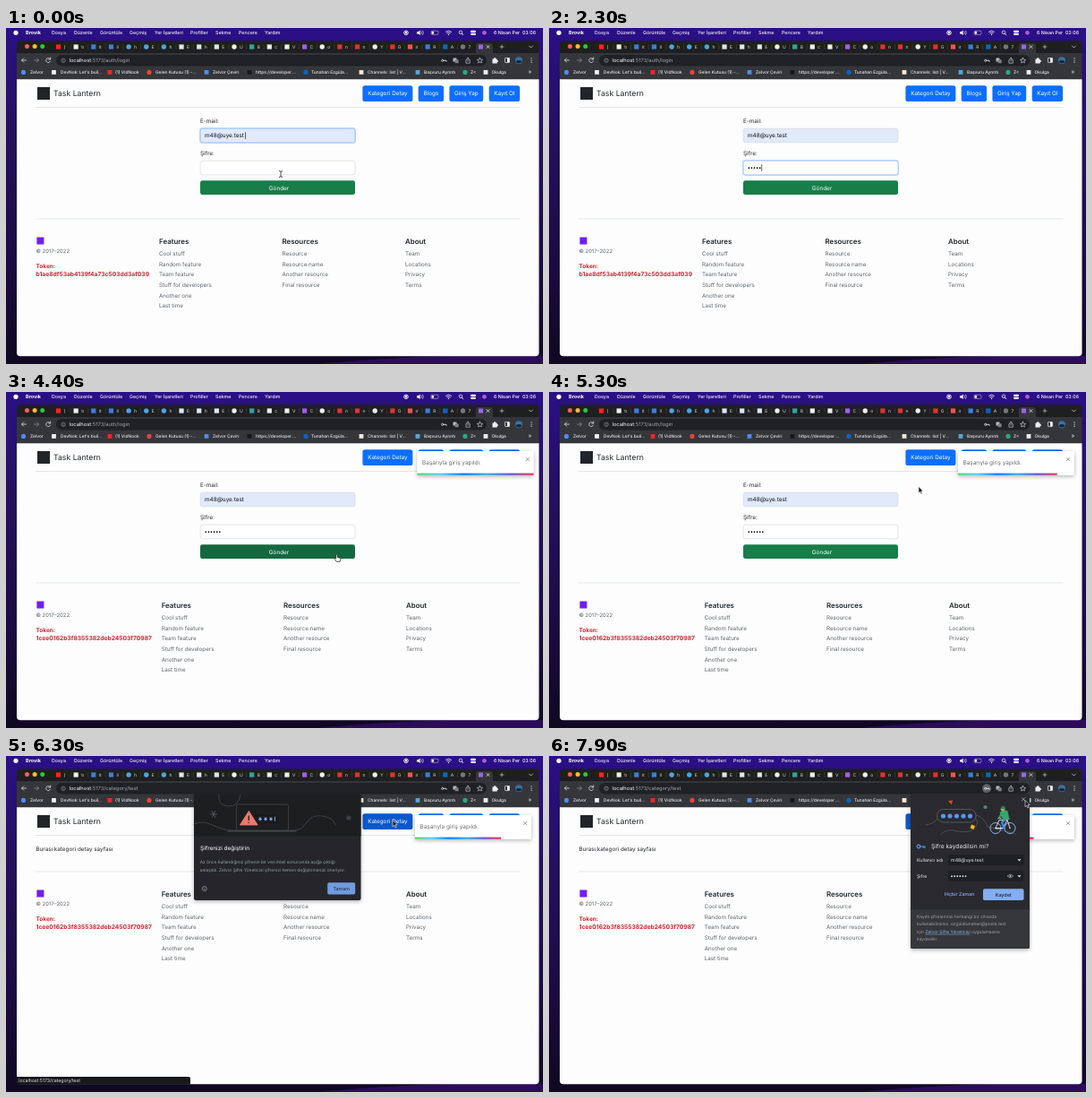
Animation, 600 px wide and 375 px high, one loop 8000 ms. Source, as an HTML page:

```html
<!DOCTYPE html>
<html lang="tr">
<head>
<meta charset="utf-8">
<title>Login screen recording</title>
<style>
  html, body { margin: 0; width: 100%; height: 100%; overflow: hidden; background: #0d0819; }
  svg { display: block; width: 100vw; height: 100vh; }
  text { font-family: Inter, "Open Sans", sans-serif; white-space: pre; text-rendering: geometricPrecision; }
</style>
</head>
<body>
<svg id="stage" viewBox="0 0 600 375"></svg>
<script>
const LOOP = 8000, STEP = 100;
const EMAIL = "m48@uye.test";
const BLUE = "#0d6efd", INK = "#212529", GRAY = "#5d656c", SOFT = "#dfe1e5", SKY = "#8ab4f8";

// Markup helpers
const rect = (x, y, w, h, fill, r = 0, more = "") =>
  `<rect x="${x}" y="${y}" width="${w}" height="${h}" rx="${r}" fill="${fill}" ${more}/>`;
const dot = (x, y, r, fill, more = "") => `<circle cx="${x}" cy="${y}" r="${r}" fill="${fill}" ${more}/>`;
const line = (d, stroke, w = 0.8, more = "") =>
  `<path d="${d}" fill="none" stroke="${stroke}" stroke-width="${w}" stroke-linecap="round" stroke-linejoin="round" ${more}/>`;
const shape = (d, fill, more = "") => `<path d="${d}" fill="${fill}" ${more}/>`;
const text = (x, y, s, size, fill, more = "") =>
  `<text x="${x}" y="${y}" font-size="${size}" fill="${fill}" ${more}>${s}</text>`;
const group = (id, body, more = "") => `<g id="${id}" ${more}>${body}</g>`;
const dots = (n, x, y, gap, r, fill) =>
  Array.from({ length: n }, (_, i) => dot(x + i * gap, y, r, fill)).join("");
const MIDDLE = 'text-anchor="middle"', BOLD = 'font-weight="700"', MEDIUM = 'font-weight="500"';
const cross = (x, y, r, color) =>
  line(`M${x - r} ${y - r}l${2 * r} ${2 * r}m0 ${-2 * r}l${-2 * r} ${2 * r}`, color, 0.7);

function desktop() {
  const menu = [["Dosya", 51], ["Düzenle", 76], ["Görüntüle", 105], ["Geçmiş", 138], ["Yer İşaretleri", 166],
    ["Profiller", 206], ["Sekme", 234], ["Pencere", 260], ["Yardım", 289]];
  return rect(0, 0, 600, 375, "url(#wall)") + shape("M350 375q70-7 150-9h100v9z", "#2c0c58") +
    rect(0, 0, 600, 11, "#2b0f86") +
    dot(11, 5.3, 2.6, "#fff") + text(22, 7.2, "Brovik", 5.5, "#fff", BOLD) +
    menu.map(([s, x]) => text(x, 7.2, s, 5.3, "#f4f1fa", MEDIUM)).join("") +
    dot(447, 5.3, 2.3, "none", 'stroke="#fff" stroke-width=".9"') + dot(447, 5.3, 1.2, "#fff") +
    shape("M459 4.2h1.6l2-1.6v5.4l-2-1.6H459z", "#fff") + line("M464 3.8q1.2 1.5 0 3M465.6 3q1.8 2.3 0 4.6", "#fff", 0.6) +
    rect(475, 3.2, 8, 4.2, "none", 1, 'stroke="#bbb" stroke-width=".6"') + rect(475.7, 3.9, 2.2, 2.8, "#fff") +
    line("M491.5 4.2q3-2.4 6 0M492.8 5.7q1.7-1.4 3.4 0", "#fff", 0.8) + dot(494.5, 7.2, 0.7, "#fff") +
    dot(508, 4.8, 1.8, "none", 'stroke="#fff" stroke-width=".7"') + line("M509.3 6.2l1.5 1.6", "#fff") +
    rect(519, 2.8, 6, 2.2, "#fff", 1.1) + rect(519, 5.7, 6, 2.2, "#fff", 1.1) +
    dot(534.5, 5.3, 2.4, "#b05bd6") +
    text(592, 7.2, "6 Nisan Per  03:06", 5.3, "#fff", 'text-anchor="end" ' + MEDIUM);
}

function tabs() {
  const labels = "(,tı,it,ll,h,E,h,E,h,E,U,B,c,V,C,o,n,n,Y,G,ir,R,A,7".split(",");
  const tones = ["#f22", "#eee", "#3b7ddd", "#3b7ddd", "#4da3e8", "#4da3e8", "#4da3e8", "#dce6f7", "#dce6f7",
    "#dce6f7", "#eee", "#36a0a8", "#eee", "#eee", "#a45cf0", "#eee", "#d33", "#d33",
    "#eee", "#d33", "#e55", "#3b7ddd", "#0a66c2", "#777"];
  const round = [4, 5, 6, 10, 15, 18, 23], gap = 19.65;
  return rect(12, 14, 583.5, 40, "#1f1f22", 4) +
    ["#ff5f57", "#febc2e", "#28c840"].map((c, i) => dot(23.5 + i * 8.6, 20.6, 2.5, c)).join("") +
    labels.map((s, i) => {
      const x = 58.5 + i * gap;
      const icon = round.includes(i) ? dot(x, 21, 2.7, tones[i]) : rect(x - 2.6, 18.4, 5.2, 5.2, tones[i]);
      return icon + text(x + 6, 23, s, 5, "#d5d6d9") + (i < 23 ? line(`M${x + 13.5} 18.5v5`, "#55565a", 0.4) : "");
    }).join("") +
    shape("M523 29q2 0 2-3v-6q0-3 3-3h13q3 0 3 3v6q0 3 2 3z", "#35363a") +
    rect(528, 18.5, 5, 5, "#9b62f0") + cross(538.5, 21, 1.5, "#fff") +
    line("M552 21h4m-2-2v4", SOFT, 0.6) + line("M584.5 20l2 2 2-2", SOFT, 0.7);
}

function toolbar() {
  const marks = [[19.5, "#4c8bf5", 27, "Zelvor"], [53.5, "#f0f0f0", 61, "DevNok: Let's buil..."],
    [116, "#f22", 122, "(1) VidNook"], [160, "#ea4335", 167, "Gelen Kutusu (1) -..."],
    [224, "#4c8bf5", 231, "Zelvor Çeviri"], [272, "#16181c", 279, "https://developer...."],
    [335, "#0a66c2", 341, "Tunahan Ezgüla..."], [397, "#f4e9d4", 404, "Channels: list | V..."],
    [460, "#54a8d8", 467, "Başvuru Ayrıntı"], [513, "#2aa978", 519, "Z<"], [536, "#eee", 542.5, "Okulga"]];
  return rect(12, 28, 583.5, 30, "#35363a") + rect(56, 30, 481, 12.4, "#202124", 6.2) +
    line("M22.5 36h-5m2.2-2.2L17.5 36l2.2 2.2", SOFT) + line("M31.5 36h5m-2.2-2.2l2.2 2.2-2.2 2.2", "#85878b") +
    line("M49.4 34.8a2.5 2.5 0 1 0 .1 2.3M49.7 33v2h-2", SOFT) +
    dot(64, 36.2, 2.2, "none", 'stroke="#9aa0a6" stroke-width=".6"') + line("M64 36v1.2m0-2.3v.1", "#9aa0a6", 0.6) +
    `<text x="70.5" y="38.2" font-size="5.75" fill="#fff">localhost<tspan id="path" fill="#a5a9af"></tspan></text>` +
    dot(489, 36.3, 5, "#5f6368", 'id="keyGlow"') + dot(487.7, 36.3, 1.1, "none", 'stroke="#fff" stroke-width=".7"') +
    line("M489 36.3h3v1", "#fff", 0.8) +
    rect(499.5, 33.5, 4, 4, "#b8bbc0", 0.5) + rect(501.7, 35.3, 4, 4, "#7c8085", 0.5) +
    line("M514.7 35.6h-.8v3.6h4.4v-3.6h-.8M516.1 37v-3.8m-1.3 1.2l1.3-1.3 1.3 1.3", SOFT, 0.6) +
    line("M529.5 33.2l.9 2 2.2.2-1.7 1.4.5 2.2-1.9-1.2-1.9 1.2.5-2.2-1.7-1.4 2.2-.2z", SOFT, 0.6) +
    shape("M543.5 34.5h1.5q0-1.5 1.2-1.5t1.2 1.5h1.3v1.6q1.4 0 1.4 1t-1.4 1v1.3h-5.2z", "#eee") +
    rect(557.5, 33.5, 5, 5, "none", 0.6, 'stroke="#eee" stroke-width=".7"') + rect(560, 33.5, 2.5, 5, "#eee") +
    dot(573, 36.2, 4, "#3971a8") + shape("M569.4 37.2q3.6-2.5 7.2 0a4 4 0 0 1-7.2 0z", "#12283c") +
    [33.8, 36, 38.2].map(y => dot(587, y, 0.6, "#fff")).join("") +
    marks.map(([ix, c, tx, s], i) =>
      (i % 3 ? rect(ix - 2.4, 47, 4.8, 4.8, c) : dot(ix, 49.4, 2.6, c)) + text(tx, 51.2, s, 4.85, "#e8eaed", MEDIUM)).join("") +
    text(583.5, 51.4, "»", 6.5, "#e8eaed");
}

function header() {
  const buttons = [["Kategori Detay", 398.4, 56], ["Blogs", 460.7, 28.4], ["Giriş Yap", 495.4, 37.8], ["Kayıt Ol", 539.7, 34.4]];
  return rect(35, 66, 14, 14, INK) + text(53, 76.4, "Task Lantern", 8.7, INK) +
    buttons.map(([s, x, w], i) => rect(x, 64.2, w, 17.8, BLUE, 2.6, `id="nav${i}"`) +
      text(x + w / 2, 75.3, s, 6.35, "#fff", MIDDLE)).join("") +
    line("M33.5 88.5H574", "#d9dce0", 0.7);
}

const field = (id, y) => rect(216, y - 1, 175, 18, "#c2dbfe", 3.4, `id="${id}Ring"`) +
  rect(217.2, y + 0.2, 172.8, 15.6, "#fff", 2.4, `id="${id}" stroke="#ced4da" stroke-width=".6"`);

function form() {
  return text(217, 106.3, "E-mail:", 6.35, INK) + field("mail", 112) + text(222, 122.4, EMAIL, 6.4, "#111") +
    text(217, 142.2, "Şifre:", 6.35, INK) + field("pass", 148) + group("typed", "") +
    rect(0, 0, 0.6, 7.5, "#000", 0, 'id="caret"') +
    rect(215.9, 169.2, 175.2, 18, "#b5d8c8", 3.4, 'id="sendRing"') +
    rect(217, 170.3, 173, 15.8, "#177d49", 2.4, 'id="send"') +
    text(305, 180.6, "Gönder", 6.35, "#fff", MIDDLE);
}

function footer() {
  const columns = [
    ["Features", "Cool stuff", "Random feature", "Team feature", "Stuff for developers", "Another one", "Last time"],
    ["Resources", "Resource", "Resource name", "Another resource", "Final resource"],
    ["About", "Team", "Locations", "Privacy", "Terms"]];
  return line("M33.5 213H574", "#d9dce0", 0.7) + rect(34.4, 233.5, 8, 8, "#6f1ff2") +
    text(33.5, 251.2, "© 2017–2022", 5.9, GRAY) +
    text(33.5, 267.7, "Token:", 6.5, "#d5222f", BOLD) + text(33.5, 277.3, "", 6.7, "#d5222f", BOLD + ' id="token"') +
    columns.map(([title, ...items], i) => group("col" + i,
      text(0, 241.4, title, 7.9, INK, 'font-weight="600"') +
      items.map((s, k) => text(0, 254 + k * 11.68, s, 6.27, GRAY)).join(""))).join("");
}

function toast() {
  return rect(457, 66, 130, 26.8, "#fff", 1.6, 'filter="url(#shade)"') +
    text(462.5, 81.3, "Başarıyla giriş yapıldı.", 6.45, "#6c6c6c") + cross(580.2, 75, 1.7, "#777") +
    rect(457, 90.6, 130, 2.2, "url(#rainbow)", 0, 'id="progress"');
}

function bicycle() {
  const wheel = x => dot(x, 80.5, 6, "none", 'stroke="#8ab4f8" stroke-width="1"') + dot(x, 80.5, 0.8, SKY);
  return wheel(499) + wheel(515) +
    line("M499 80.5l4-9h9l-5 9zl8 0M512 71.5l3 9M502 69.5h3", "#e8eaed", 0.9) +
    line("M511 70l-5 4 2.5 6.5", "#4285f4", 2.2) +
    shape("M503.5 63q4.5-4 9-1.5l2 9.5-7 .8z", "#34a86c") + line("M505.5 64.5l-3 5", "#34a86c", 1.8) +
    dot(507, 59.3, 2.3, "#d99a78") + shape("M504.5 58.8q.5-3.4 3.5-3 2.6.6 1.9 3.6z", "#2e7d52");
}

function savePopup() {
  const note = ["Kayıtlı şifrelerinizi herhangi bir cihazda", "kullanabilirsiniz. ezgulatunahan@posta.test",
    `için <tspan fill="${SKY}" text-decoration="underline">Zelvor Şifre Yöneticisi</tspan> uygulamasına`, "kaydedilir."];
  const label = (y, s) => text(411, y + 1.9, s, 5.2, "#e8eaed") + rect(446, y - 6, 84.5, 12, "#1f2023", 1.5) +
    shape(`M523.5 ${y - 0.8}h4l-2 2.2z`, "#e8eaed");
  return rect(404, 42.5, 133, 172.5, "#292a2d", 2, 'filter="url(#shade)"') +
    shape("M404 172h133v41q0 2-2 2H406q-2 0-2-2z", "#36373a") + line("M404 172h133", "#434448", 0.5) +
    line("M421 77q8-1 12-6t5-9M477 70q4 6 -2 11t-19 3q-10-4-18 3M477 66q9 2 13 13l31 8", "#63666b", 0.6) +
    rect(433.5, 59.5, 43.5, 14.5, "#292a2d", 7, 'stroke="#686b70" stroke-width=".7"') +
    dots(5, 440.5, 67, 7.5, 2.6, "#5b94f2") +
    shape("M446 50.2l5-1-1.3 5z", "#ea4335") + dot(487.5, 57, 2.1, "#4c8f68") +
    shape("M472 76.5l4 1.4-1.6 4-3.7-1.6z", "#fbbc04") + bicycle() + cross(530.2, 48.3, 1.7, "#c4c7cb") +
    dot(413, 101, 1.9, "none", 'stroke="#5b94f2" stroke-width="1.1"') + line("M415 101h5v1.6m-1.8-1.6v1.2", "#5b94f2", 1.1) +
    text(427, 103.4, "Şifre kaydedilsin mi?", 6.65, "#e8eaed") +
    label(116, "Kullanıcı adı") + text(449, 118, EMAIL, 5.3, "#e8eaed") +
    label(134, "Şifre") + dots(6, 450, 134.2, 3.1, 0.9, "#e8eaed") +
    line("M512.5 134q3-3.6 6 0-3 3.6-6 0z", "#bdc1c6", 0.7) + dot(515.5, 134, 0.9, "#bdc1c6") +
    text(458.5, 156.4, "Hiçbir Zaman", 5.3, SKY, MIDDLE + " " + MEDIUM) +
    rect(485, 148.2, 45.5, 12.8, "#83aef4", 1.8) + text(507.7, 156.5, "Kaydet", 5.4, "#202124", MIDDLE + " " + MEDIUM) +
    note.map((s, i) => text(411, 180.6 + i * 8.6, s, 4.9, "#9aa0a6")).join("");
}

function breachPopup() {
  const star = (x, y, r, c) => line(`M${x - r} ${y}h${2 * r}M${x - r / 2} ${y - r}l${r} ${2 * r}m0 ${-2 * r}l${-r} ${2 * r}`, c, 0.9);
  return rect(210, 42.5, 186.5, 118.5, "#252629", 2, 'filter="url(#shade)"') +
    rect(210, 42.5, 186.5, 47, "#1d1e20") +
    line("M210 76q10-4 18 0t20 7h74q8 0 14-9t18-7 14 10M238 43q-2 12 10 13t14-13", "#3f4144", 1) +
    rect(257.5, 54, 58, 29, "#1d1e20", 2, 'stroke="#434548" stroke-width=".8"') + line("M248 84h76", "#505357", 1.2) +
    star(232, 65, 3.4, "#55585c") + dot(383, 69, 2.6, "#3c3e41") +
    rect(277, 65.5, 27, 9.5, "#18191b", 2) +
    [284, 290, 296].map(x => star(x, 70.3, 1.6, SKY)).join("") + line("M300.5 68v4.4", SKY, 0.9) +
    shape("M271.3 61.5l9.8 15.4h-19.6z", "#e9796e", 'stroke="#e9796e" stroke-width="1" stroke-linejoin="round"') +
    line("M271.3 67v4.6m0 2.6v.1", "#252629", 1.4) +
    text(217, 105.4, "Şifrenizi değiştirin", 6.4, "#e8eaed", MEDIUM) +
    text(216.7, 120.4, "Az önce kullandığınız şifrenin bir veri ihlali sonucunda açığa çıktığı", 4.85, "#9aa0a6") +
    text(216.7, 128.8, "anlaşıldı. Zelvor Şifre Yöneticisi şifrenizi hemen değiştirmenizi öneriyor.", 4.85, "#9aa0a6") +
    dot(221.7, 148, 2.5, "none", 'stroke="#9aa0a6" stroke-width=".7"') + line("M221.7 148v1.3m0-2.6v.1", "#9aa0a6", 0.7) +
    rect(359.2, 141.3, 31, 13.2, "#729bdf", 1.8) + text(374.7, 149.9, "Tamam", 5.3, "#202124", MIDDLE);
}

const pointers = {
  beam: line("M-1.6-3.5q1.6 0 1.6 1v5q0 1-1.6 1M1.6-3.5q-1.6 0-1.6 1m0 5q0 1 1.6 1", "#222", 0.8),
  hand: shape("M-1.3-3.2q1-1 1.6.2v2.4l3 .9q.8.4.6 1.4l-.8 2.6h-3.8L-3 1.4q-.3-1.2.8-1l.9.7z", "#fff",
    'stroke="#111" stroke-width=".7" stroke-linejoin="round"'),
  arrow: shape("M0-2.5v7.2l1.7-1.5 1.2 2.7 1.2-.5-1.2-2.7h2.3z", "#111", 'stroke="#fff" stroke-width=".6"')
};

const stops = colors => colors.map((c, i) => `<stop offset="${i / (colors.length - 1)}" stop-color="${c}"/>`).join("");
document.getElementById("stage").innerHTML = `<defs>
  <linearGradient id="wall" x2="0" y2="1">${stops(["#2b0f86", "#25105c", "#1d0b45", "#0f0822"])}</linearGradient>
  <linearGradient id="rainbow">${stops(["#4cd964", "#5ac8fa", "#007aff", "#34aadc", "#5856d6", "#ff2d55"])}</linearGradient>
  <filter id="shade" x="-20%" y="-20%" width="140%" height="150%">
    <feDropShadow dx="0" dy="1.5" stdDeviation="2.2" flood-color="#000" flood-opacity=".3"/></filter>
  <clipPath id="pageClip">${rect(12, 57.3, 583.5, 309, "#000")}</clipPath></defs>` +
  desktop() + tabs() + toolbar() + shape("M12 57.3h583.5v305q0 4-4 4H16q-4 0-4-4z", "#fdfdfd") +
  group("page", header() + group("form", form()) +
    group("detail", text(33.5, 106.3, "Burası kategori detay sayfası", 6.3, INK)) +
    group("footer", footer()) + group("toast", toast()), 'clip-path="url(#pageClip)"') +
  group("status", shape("M12 358h192q2 0 2 2v6.7H16q-4 0-4-4z", "#18191b") +
    text(14.3, 364.2, "localhost:5173/category/test", 5.15, "#e8eaed")) +
  group("save", savePopup()) + group("breach", breachPopup()) +
  Object.entries(pointers).map(([id, body]) => group(id, body)).join("");

const parts = {};
document.querySelectorAll("[id]").forEach(el => parts[el.id] = el);
const set = (id, attrs) => { for (const k in attrs) parts[id].setAttribute(k, attrs[k]); };
const show = (id, on) => set(id, { visibility: on ? "visible" : "hidden" });
const move = (id, x, y) => set(id, { transform: `translate(${x} ${y})` });
const between = (t, a, b) => t >= a && t < b;
const fade = (t, a, b) => Math.max(0, Math.min(1, (t - a) / 150, (b - t) / 150));

// Keys are [time, value]; smooth adds ease in and out.
function track(t, keys, smooth) {
  if (t <= keys[0][0]) return keys[0][1];
  for (let i = 1; i < keys.length; i++) {
    const [a, from] = keys[i - 1], [b, to] = keys[i];
    if (t < b) {
      const u = (t - a) / (b - a);
      return from + (to - from) * (smooth ? u * u * (3 - 2 * u) : u);
    }
  }
  return keys[keys.length - 1][1];
}

const CLICK_PASS = 400, TYPING = 1300, KEY_GAP = 220, POINTER_BACK = 2800, SUBMIT = 3600;
const LOGIN = 3900, HOVER_NAV = 5500, OPEN_DETAIL = 5700, BREACH = 6200, DISMISS = 7400;
const POINTER = [[0, 307, 163], [300, 307, 163], [600, 305, 157], [POINTER_BACK, 305, 157], [3500, 370, 185],
  [4700, 370, 185], [5650, 432, 74], [6400, 432, 74], [7050, 369, 148], [DISMISS, 369, 148], [7850, 532, 52]];
const pointerX = POINTER.map(([t, x]) => [t, x]), pointerY = POINTER.map(([t, , y]) => [t, y]);
const SLIDE = [[3880, 200], [4300, -10], [4405, 3.2], [4510, -2], [4580, 0]];
// The toast timer halts while a popup holds the focus.
const PROGRESS = [[4580, 1], [OPEN_DETAIL, 0.77], [BREACH - 100, 0.77], [BREACH, 0.74], [DISMISS, 0.74], [7900, 0.65]];

function render(t) {
  const loggedIn = t >= LOGIN, detail = t >= OPEN_DETAIL, inMail = t < CLICK_PASS;
  const inPass = between(t, CLICK_PASS, SUBMIT), typing = between(t, TYPING, POINTER_BACK);
  const x = track(t, pointerX, true), y = track(t, pointerY, true);
  const overSend = !detail && between(y, 170, 186.5) && between(x, 217, 390);
  const overNav = between(t, HOVER_NAV, DISMISS);

  parts.path.textContent = ":5173/" + (detail ? "category/test" : "auth/login");
  show("form", !detail);
  show("detail", detail);
  move("footer", 0, detail ? -84 : 0);
  parts.token.textContent = loggedIn ? "1cee0162b3f8355382deb24503f70987" : "b1ae8df53ab4139f4a73c503dd3af039";
  (loggedIn ? [173.7, 310, 447] : [171, 308.5, 446]).forEach((cx, i) => move("col" + i, cx, 0));

  for (const [id, on, fill] of [["mail", inMail, "#e0eafb"], ["pass", inPass, "#fff"]]) {
    set(id + "Ring", { opacity: on ? 1 : 0 });
    set(id, { fill, stroke: on ? "#86b7fe" : "#ced4da" });
  }
  const count = Math.max(0, Math.min(6, 1 + Math.floor((t - TYPING) / KEY_GAP)));
  parts.typed.innerHTML = dots(count, 223.3, 156.2, 3.1, 0.85, "#111");
  const caretOn = t < SUBMIT && (typing || t % 1000 < 500);
  set("caret", { x: inMail ? 267.2 : 222 + count * 3.1, y: inMail ? 116.3 : 152.3, opacity: caretOn ? 1 : 0 });
  set("send", { fill: overSend ? "#14683f" : "#177d49" });
  set("sendRing", { opacity: between(t, SUBMIT, LOGIN) ? 0.5 : 0 });
  set("nav0", { fill: t >= HOVER_NAV ? "#0b57cc" : BLUE });

  show("toast", t >= 3880);
  move("toast", track(t, SLIDE), 0);
  set("progress", { width: 130 * track(t, PROGRESS) });

  const save = Math.max(fade(t, OPEN_DETAIL, BREACH), fade(t, DISMISS, LOOP + 200));
  set("save", { opacity: save });
  set("keyGlow", { opacity: save });
  set("breach", { opacity: fade(t, BREACH - 100, DISMISS + 50) });
  show("status", overNav);

  const kind = overSend || between(t, HOVER_NAV, OPEN_DETAIL + 100) ? "hand"
    : !detail && between(y, 148, 164) && x < 390 ? "beam" : "arrow";
  for (const id in pointers) {
    show(id, id === kind && !typing);
    move(id, x, y);
  }
}

const start = performance.now();
function tick(now) {
  const t = Math.max(0, now - start) % LOOP;
  render(Math.floor(t / STEP) * STEP);
  requestAnimationFrame(tick);
}
render(0);
requestAnimationFrame(tick);
</script>
</body>
</html>
```
